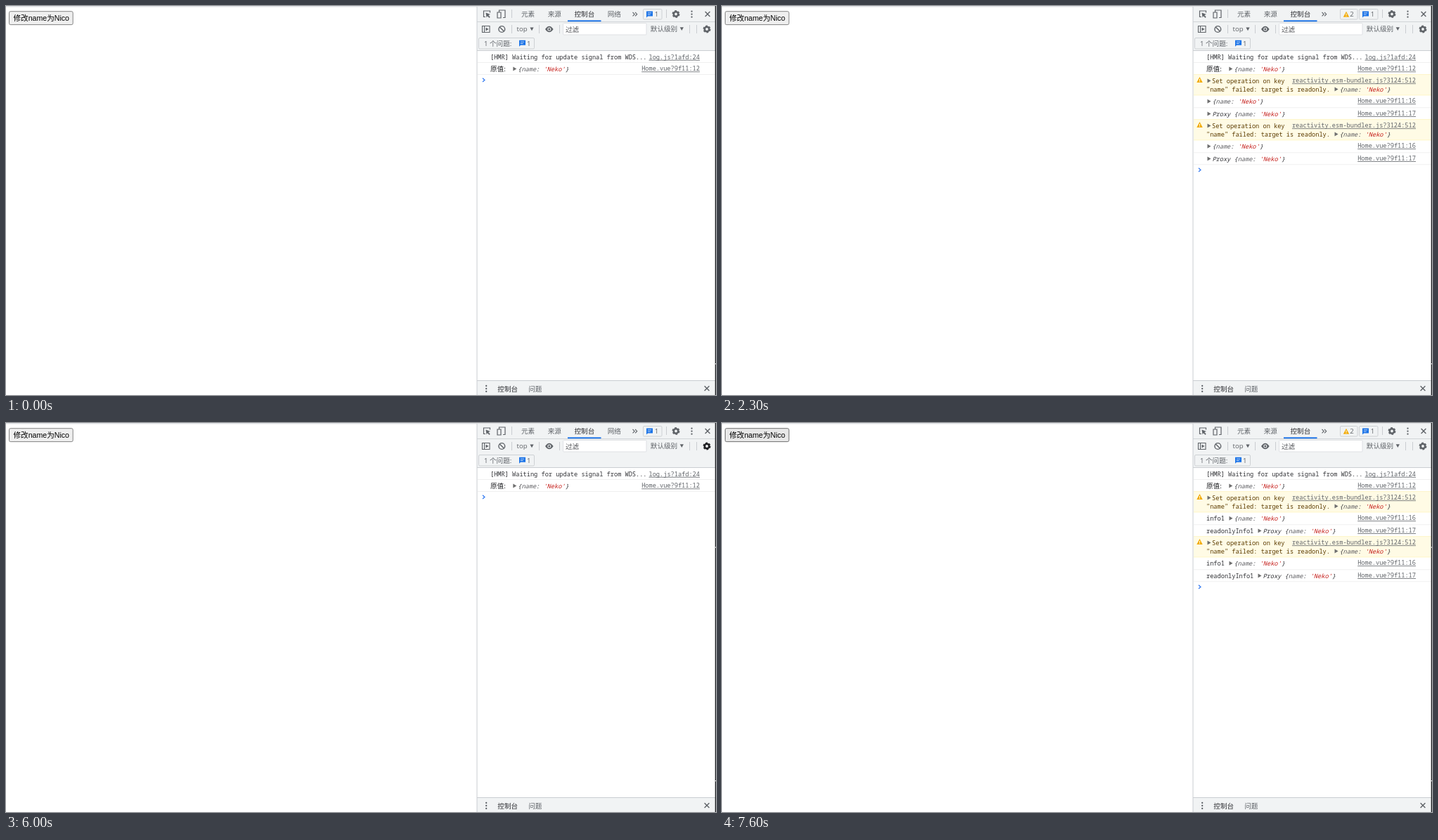
An HTML page that plays this animation: 1010x554 px, repeating every 8000 ms.

```html
<!DOCTYPE html>
<html lang="zh">
<head>
<meta charset="utf-8">
<title>Readonly console demo</title>
<style>
html, body { margin: 0; width: 100%; height: 100%; overflow: hidden; background: #fff; }
svg { display: block; }
text { white-space: pre; }
.ui { font: 9.6px "Open Sans", "Noto Sans CJK SC", sans-serif; }
.mono { font: 8.63px "Noto Sans Mono", "Noto Sans CJK SC", monospace; }
.button { font: 10.6px "Liberation Sans", "Noto Sans CJK SC", sans-serif; }
.object { font-style: italic; }
</style>
</head>
<body>
<svg id="stage" width="1010" height="554" viewBox="0 0 1010 554"></svg>
<script>
const LOOP = 8000;
const GREY = '#5f6368', DARK = '#303135', LINE = '#cacdd1', BAR = '#f1f3f4', BLUE = '#1a73e8';
const CHAR = 5.178;
const stage = document.getElementById('stage');

// Each entry changes part of the state from its time on.
const timeline = [
  [0, { runs: 0, warnings: 0, button: 'idle', hover: '', labels: false }],
  [700, { button: 'over' }],
  [1100, { button: 'down' }],
  [1200, { button: 'over', runs: 1 }],
  [1300, { warnings: 1 }],
  [1900, { button: 'down' }],
  [2000, { button: 'over', runs: 2 }],
  [2100, { warnings: 2 }],
  [2300, { button: 'idle' }],
  [5400, { hover: 'sources' }],
  [5500, { hover: 'levels' }],
  [5600, { hover: '' }],
  [5900, { runs: 0, warnings: 0, labels: true }],
  [6000, { hover: 'gear' }],
  [6100, { hover: '' }],
  [6600, { button: 'over' }],
  [6800, { button: 'down' }],
  [6900, { button: 'over', runs: 1, warnings: 1 }],
  [7400, { button: 'down' }],
  [7500, { button: 'over', runs: 2 }],
  [7600, { warnings: 2 }]
];
const buttonColors = {
  idle: ['#efefef', '#767676'],
  over: ['#e8e8e8', '#606060'],
  down: ['#f5f5f5', '#8d8d8d']
};

const rect = (x, y, w, h, fill, more = '') =>
  `<rect x="${x}" y="${y}" width="${w}" height="${h}" fill="${fill}" ${more}/>`;
const box = (x, y, w, h, fill, stroke, r = 1.5) =>
  rect(x, y, w, h, fill, `stroke="${stroke}" stroke-width=".9" rx="${r}"`);
const path = (d, stroke, width = 1.2, fill = 'none') =>
  `<path d="${d}" stroke="${stroke}" stroke-width="${width}" fill="${fill}"/>`;
const shape = (d, fill) => `<path d="${d}" fill="${fill}" fill-rule="evenodd"/>`;
const circle = (x, y, r, fill, more = '') => `<circle cx="${x}" cy="${y}" r="${r}" fill="${fill}" ${more}/>`;
const text = (x, y, s, fill = GREY, kind = 'ui') =>
  `<text x="${x}" y="${y}" fill="${fill}" class="${kind}">${s}</text>`;
const mono = (x, y, s, fill = DARK) => text(x, y, s, fill, 'mono');

const divider = (x, y) => rect(x, y, 1, 12, LINE);
const dots = (x, y) => [-4, 0, 4].map(d => circle(x, y + d, 1.15, GREY)).join('');
const cross = (x, y) => path(`M${x - 3.4} ${y - 3.4}l6.8 6.8m0 -6.8l-6.8 6.8`, GREY, 1.4);
const caret = (x, y) => shape(`M${x - 2.6} ${y - 2.3}h5.2l-2.6 4.8z`, GREY);
const arrow = (x, y) => shape(`M${x} ${y - 3}l5 3l-5 3z`, '#6e6e6e');
const chat = (x, y) => shape(
  `M${x} ${y}h9v7h-7l-2 2zM${x + 1.8} ${y + 2}h5.4v.8h-5.4zM${x + 1.8} ${y + 4.2}h3.8v.8h-3.8z`, BLUE);
const warnSign = (x, y) =>
  shape(`M${x + 4.2} ${y}l4.2 8h-8.4z`, '#f2ab08') + rect(x + 3.7, y + 2.8, 1, 2.6, '#fff') +
  rect(x + 3.7, y + 6, 1, 1, '#fff');
const gear = (x, y, color) =>
  circle(x, y, 3.2, 'none', `stroke="${color}" stroke-width="2.6"`) +
  circle(x, y, 4.7, 'none', `stroke="${color}" stroke-width="1.6" stroke-dasharray="2.7 2.222"`);

function link(y, s) {
  const width = s.length * CHAR, x = 987 - width;
  return mono(x, y, s, GREY) + rect(x, y + 1, width, .8, GREY);
}

function object(x, y, prefix = '') {
  const part = (fill, s) => `<tspan fill="${fill}">${s}</tspan>`;
  return arrow(x, y - 3) + text(x + 6.9, y,
    prefix + '{' + part('#5b5b5f', 'name') + ': ' + part('#c41a16', "'Neko'") + '}', DARK, 'mono object');
}

const rowLine = y => rect(671, y, 338, 1, '#f0f0f0');

function page(s) {
  const [fill, border] = buttonColors[s.button];
  return rect(0, 0, 1010, 1.5, '#dfe1e4') + box(4.5, 7.7, 90.7, 18.9, fill, border, 2) +
    text(10.5, 21.2, '修改name为Nico', '#000', 'button');
}

function tabs(s) {
  const warned = s.warnings > 0, sources = s.hover === 'sources';
  const more = warned ? 853.5 : 891.5;
  let out = path('M682 15.5h-2.5v-8.5h9v2.5', GREY) +
    shape('M682.5 9.5l6.5 2.6l-2.7 1l2.4 2.7l-1.3 1.2l-2.4 -2.7l-1.4 2.2z', GREY) +
    path('M701.5 8.5v-2.5h8.5v10.5h-3M699 9h5v8h-5z', GREY) + divider(719, 5);
  if (sources) out += rect(762, 1.5, 37, 20.5, '#e8eaed');
  out += text(733, 15.3, '元素') + text(770.7, 15.3, '来源', sources ? DARK : GREY) +
    text(808.5, 15.3, '控制台', DARK) + rect(799, 20.3, 47.5, 1.9, BLUE);
  if (!warned) out += text(855.7, 15.3, '网络');
  out += path(`M${more} 9l2.7 2.7l-2.7 2.7m3.5 -5.4l2.7 2.7l-2.7 2.7`, GREY, 1.1);
  if (warned) out += box(879.5, 4.5, 24.5, 14.5, BAR, LINE) + warnSign(883.8, 7.8) + text(893.3, 15.3, s.warnings);
  return out + box(906.5, 4.5, 26.5, 14.5, BAR, LINE) + chat(911, 7.5) + text(922.8, 15.3, '1') +
    divider(939, 5) + gear(953, 11.5, GREY) + dots(975.5, 11.7) + cross(998, 11.5);
}

function filters(s) {
  return path('M677.5 28.5h10.5v9h-10.5zM680.5 28.5v9', GREY, 1.1) + shape('M682.5 30.5l4 2.5l-4 2.5z', GREY) +
    circle(705.3, 33, 4.4, 'none', `stroke="${GREY}" stroke-width="1.4"`) + path('M702.2 29.9l6.2 6.2', GREY, 1.4) +
    divider(719, 27) + text(726.5, 36.3, 'top') + caret(748, 32.8) + divider(758, 27) +
    shape('M767 33q5.8 -8.6 11.6 0q-5.8 8.6 -11.6 0z', GREY) + circle(772.8, 33, 2.5, BAR) + circle(772.8, 33, 1.5, GREY) +
    divider(787, 27) + box(792.5, 24.5, 118.5, 16.5, '#fff', '#dcdee1', 1) + text(796, 36.8, '过滤', '#505256') +
    text(916.8, 36.3, '默认级别', s.hover === 'levels' ? DARK : GREY) + caret(961.3, 32.6) +
    divider(972, 27) + divider(982, 27) + gear(997, 33, s.hover === 'gear' ? '#202124' : GREY) +
    box(672.5, 45.5, 79, 15.5, BAR, LINE) + text(680, 57, '1 个问题:') + chat(730, 48.7) + text(741, 57, '1');
}

function run(y, labels) {
  const first = labels ? mono(689, y + 41.5, 'info1') + object(721.5, y + 41.5) : object(690.5, y + 41.5);
  const second = labels ? mono(689, y + 59.6, 'readonlyInfo1') + object(762.5, y + 59.2, 'Proxy ')
    : object(690.5, y + 59.2, 'Proxy ');
  return rect(671, y, 338, 30, '#fffbe5') + rect(671, y, 338, .8, '#fff5c2') + rect(671, y + 29.2, 338, .8, '#fff5c2') +
    warnSign(675.3, y + 3.8) + arrow(690.5, y + 9.2) +
    mono(697, y + 12.2, 'Set operation on key', '#5c3c00') + link(y + 12, 'reactivity.esm-bundler.js?3124:512') +
    mono(689, y + 25, '"name" failed: target is readonly.', '#5c3c00') + object(871.5, y + 24.2) +
    first + link(y + 41, 'Home.vue?9f11:16') + rowLine(y + 47) +
    second + link(y + 58.8, 'Home.vue?9f11:17') + rowLine(y + 64);
}

function logs(s) {
  let out = mono(689, 75.8, '[HMR] Waiting for update signal from WDS...') + link(75.8, 'log.js?1afd:24') + rowLine(80) +
    text(689, 93.2, '原值:', '#202124') + object(721.3, 92.5) + link(92.4, 'Home.vue?9f11:12') + rowLine(97);
  for (let i = 0; i < s.runs; i++) out += run(97.3 + 64 * i, s.labels);
  return out + path(`M678 ${102.8 + 64 * s.runs}l2.9 2.6l-2.9 2.6`, '#367cf1', 1.3);
}

function draw(s) {
  const edgeGap = y => rect(1008.7, y, 1.3, 1.2, '#fff');
  return page(s) + rect(670, 1.5, 339, 62, BAR) + rect(670, 22, 339, .8, LINE) + rect(670, 63, 339, 1, LINE) +
    tabs(s) + filters(s) + logs(s) +
    rect(670, 533, 339, 21, BAR) + rect(670, 533, 339, 1, LINE) + dots(683.2, 545) +
    text(699.3, 548.5, '控制台', DARK) + text(743.2, 548.5, '问题') + cross(997, 544.7) +
    rect(669.5, 1, 1, 553, LINE) + rect(1008.7, 0, 1.3, 554, '#202226') +
    edgeGap(509) + (s.labels ? edgeGap(176.5) : '');
}

const start = performance.now();
let shown = '';
function frame() {
  const time = (performance.now() - start) % LOOP;
  const state = Object.assign({}, ...timeline.filter(([at]) => at <= time).map(([, change]) => change));
  const key = JSON.stringify(state);
  if (key !== shown) {
    stage.innerHTML = draw(state);
    shown = key;
  }
  requestAnimationFrame(frame);
}
frame();
</script>
</body>
</html>
```
